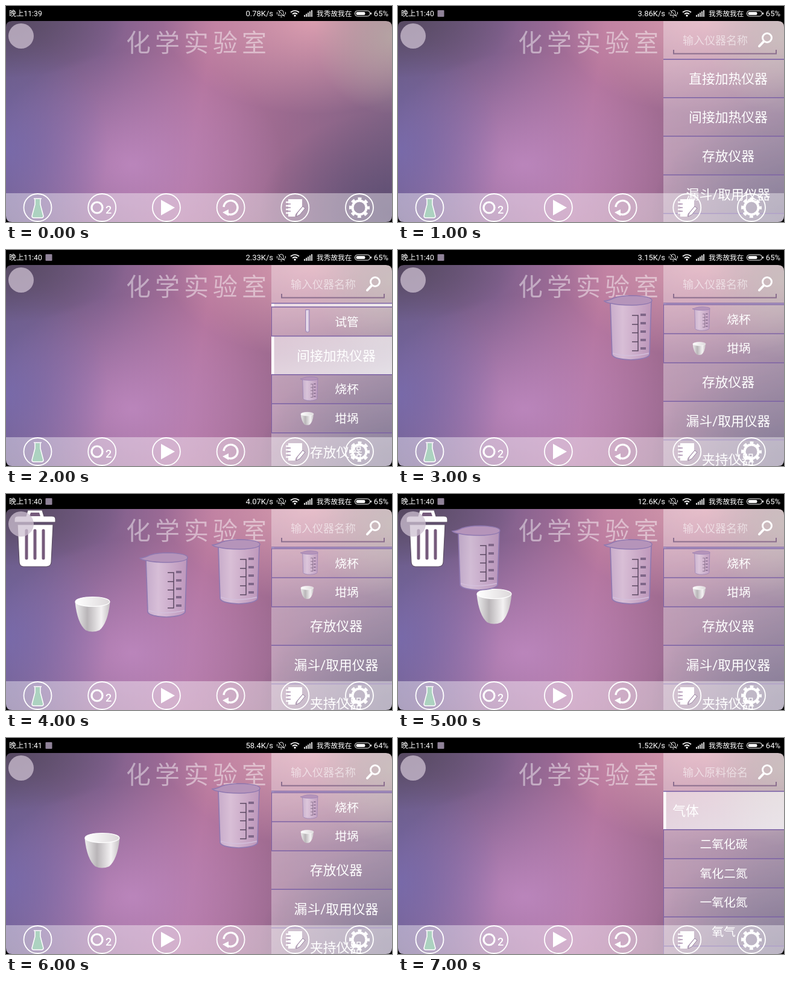
Write an HTML page that moves like this. It is 640 px wide and 360 px high and loops after 8 s.

```html
<!DOCTYPE html>
<html lang="zh-CN">
<head>
<meta charset="utf-8">
<style>
html, body { margin: 0; width: 100%; height: 100%; overflow: hidden; background: #000 }
svg {
  display: block; width: 640px; height: 360px;
  background:
    radial-gradient(200px 95px at 0 25px, #56485fee, #56485f00),
    radial-gradient(170px 190px at 0 240px, #786bade0, #786bad00),
    radial-gradient(130px 130px at 640px 50px, #b5a3a3, #b5a3a300),
    radial-gradient(250px 160px at 510px 20px, #dc9fb0, #dc9fb000),
    radial-gradient(220px 170px at 640px 345px, #5c4d72, #5c4d7200),
    radial-gradient(250px 190px at 210px 265px, #ba85bb, #ba85bb00),
    linear-gradient(100deg, #66587f, #80608d 25%, #b4749c 50%, #99698e 72%, #7c6283);
}
text { font-family: Roboto, "Noto Sans CJK SC", "Noto Sans CJK", sans-serif; fill: #fff }
.line { fill: none; stroke: #fff }
</style>
</head>
<body>
<svg viewBox="0 0 640 360">
  <defs>
    <linearGradient id="row" x2="1" y2="1">
      <stop stop-color="#fff" stop-opacity=".16"/><stop offset="1" stop-color="#fff" stop-opacity=".05"/>
    </linearGradient>
    <linearGradient id="open" x2="1" y2="1">
      <stop stop-color="#fff" stop-opacity=".48"/><stop offset="1" stop-color="#fff" stop-opacity=".75"/>
    </linearGradient>
    <linearGradient id="glass">
      <stop stop-color="#cbb5d2"/><stop offset=".3" stop-color="#dfcbe0"/><stop offset="1" stop-color="#bf9cc0"/>
    </linearGradient>
    <linearGradient id="china">
      <stop stop-color="#eee"/><stop offset=".35" stop-color="#b9b5b8"/>
      <stop offset=".75" stop-color="#f4f2f3"/><stop offset="1" stop-color="#c4bfc2"/>
    </linearGradient>
    <linearGradient id="bowl">
      <stop stop-color="#fff"/><stop offset="1" stop-color="#dcd8da"/>
    </linearGradient>
    <clipPath id="list"><path d="M440 88h200v272h-200z"/></clipPath>

    <g id="beaker">
      <path d="M10 14L13 102Q17 109 44 110Q70 109 75 102L78 12Z" fill="url(#glass)" fill-opacity=".85" stroke="#9079b1" stroke-width="1.7"/>
      <path d="M0 12Q9 11 16 7Q28 3 46 3Q79 4 79 11Q79 18 46 19Q22 19 12 16Q3 15 0 12Z" fill="#b594ba" stroke="#8f78b0" stroke-width="1.5"/>
      <path d="M14 99Q40 107 74 99" fill="none" stroke="#d3bfdc" stroke-width="1.5"/>
      <path d="M46 36H56V95H46M46 51H56M46 65H56M46 80H56" fill="none" stroke="#5b4862" stroke-width="1.5"/>
      <path d="M60 35h9m-9 14h9m-9 14h9m-9 14h9m-9 14h9" stroke="#806789" stroke-width="4"/>
    </g>
    <g id="crucible">
      <path d="M.5 10Q4 45 18 57Q29 62 41 57Q55 45 58.500 10Z" fill="url(#china)"/>
      <ellipse cx="29.500" cy="9.500" rx="28.500" ry="8" fill="url(#bowl)" stroke="#fff" stroke-width="1.2"/>
    </g>
    <g id="tube">
      <path d="M0 0H16V96Q8 108 0 96Z" fill="#d9c8e0" stroke="#9a86b8" stroke-width="3"/>
      <path d="M5 4V94" stroke="#fff" stroke-width="3"/>
    </g>
    <g id="trash" stroke-linejoin="round">
      <path d="M14 47H82V42Q82 37 76 37H63L60 27H36L33 37H20Q14 37 14 42ZM19 51H78L75 114Q74 121 67 121H29Q23 121 22 114Z" fill="#fff" stroke="#5f5166" stroke-width="1.2"/>
      <path d="M39 37L41 31H55L57 37Z" fill="#765b7c"/>
      <path d="M34 61V107M48 61V107M62 61V107" stroke="#765b7c" stroke-width="5" stroke-linecap="round"/>
    </g>
  </defs>

  <text x="199" y="76" font-size="41" font-weight="300" letter-spacing="7" fill-opacity=".45">化学实验室</text>
  <g id="scene"></g>
  <circle cx="25" cy="50" r="21" fill="#cdbfd0" opacity=".75"/>

  <path d="M0 312H640V360H0Z" fill="#fff" fill-opacity=".4"/>
  <g id="rings" class="line" stroke-width="1.8"></g>
  <path d="M46 321H59M48 322V331L43 350Q43 353 46 353H59Q62 353 62 350L57 331V322" fill="#acd2c0" stroke="#fff" stroke-width="1.5"/>
  <circle class="line" cx="151" cy="336" r="9" stroke-width="3.2"/>
  <text x="165" y="346" font-size="18" font-weight="500">2</text>
  <path d="M257 323L280 336L257 349Z" fill="#fff"/>
  <path class="line" d="M361 335A11.500 11.500 0 1 1 367 346" stroke-width="3.4"/>
  <path d="M359 344L369 339V350Z" fill="#fff"/>
  <path d="M468 322H491V334L480 347L479 351H468Z" fill="#fff"/>
  <path d="M464 327h8m-8 6h8m-8 6h8m-8 6h8" stroke="#fff" stroke-width="2.500"/>
  <path d="M467 330h5m-5 6h5m-5 6h5" stroke="#a68aac" stroke-width="1.5"/>
  <path d="M481 351L483 345L492 334L496 337L487 348Z" fill="#fff" stroke="#97809f"/>
  <circle class="line" cx="586" cy="336" r="11.5" stroke-width="4"/>
  <circle class="line" cx="586" cy="336" r="14.5" stroke-width="5" stroke-dasharray="5.7 5.690" stroke-dashoffset="2.850"/>

  <path d="M0 0H640V360H0ZM10 25Q0 25 0 35V350Q0 360 10 360H630Q640 360 640 350V35Q640 25 630 25Z" fill-rule="evenodd"/>
  <text id="clock" x="5" y="17" font-size="12.2"></text>
  <rect id="notice" x="65.500" y="7" width="11" height="11" rx="1" fill="#8f8298"/>
  <text id="speed" x="443" y="17" font-size="13" text-anchor="end"></text>
  <path class="line" d="M451 15.500Q453 14 453 11Q453 7 456.500 7Q460 7 460 11Q460 14 462 15.500ZM455 18h3M451 7L462 18M449.500 10v4M463.500 10v4" stroke-width=".9"/>
  <path class="line" d="M472 10.500Q479 5 486 10.500M475 13.500Q479 10 483 13.500" stroke-width="1.7"/>
  <circle cx="479" cy="16" r="1.700" fill="#fff"/>
  <path class="line" d="M495 18v-3M498 18v-5M501 18v-7M504 18v-9M507 18v-11" stroke-width="1.700"/>
  <text x="515" y="16.500" font-size="11.700">我秀故我在</text>
  <rect class="line" x="578.500" y="8" width="25" height="9" rx="4"/>
  <rect x="580.500" y="10" width="15" height="5" rx="2" fill="#fff"/>
  <path d="M605 11v3" stroke="#fff" stroke-width="2"/>
  <text id="charge" x="634" y="17" font-size="13" text-anchor="end"></text>
</svg>
<script>
const $ = id => document.getElementById(id);
const HEAD = 64.3, SUB = 48.5;
const head = (name, open) => ({ name, open, h: HEAD });
const sub = (name, icon) => ({ name, icon, h: SUB, x: icon ? 565 : 540 });

const closed = ['直接加热仪器', '间接加热仪器', '存放仪器', '漏斗/取用仪器', '夹持仪器'].map(n => head(n));
const tools = [
  head('直接加热仪器', true), sub('试管', 'tube'),
  head('间接加热仪器', true), sub('烧杯', 'beaker'), sub('坩埚', 'crucible'),
  ...closed.slice(2)
];
const gases = [
  { ...head('气体', true), x: 477 },
  ...['二氧化碳', '氧化二氮', '一氧化氮', '氧气', '氮气'].map(n => sub(n))
];
// icon: x, offset inside the row, scale
const icons = { tube: [497, 5, .37], beaker: [488, 3, .37], crucible: [488.5, 14, .37] };

const use = (id, x = 0, y = 0, s = 1) => `<use href="#${id}" transform="translate(${x} ${y}) scale(${s})"/>`;
const text = (s, x, y, size, extra = '') =>
  `<text x="${x}" y="${y + size * .37}" font-size="${size}" text-anchor="middle" ${extra}>${s}</text>`;

function panel(rows, top, hint) {
  let y = top, list = '';
  for (const { name, open, icon, h, x = 547.5 } of rows) {
    list += `<rect x="440" y="${y}" width="200" height="${h}" fill="url(#${open ? 'open' : 'row'})"/>`;
    if (open) list += `<rect x="440" y="${y}" width="4.5" height="${h}" fill="#fff"/>`;
    if (h == SUB) list += `<path d="M440.5 ${y}v${h}" stroke="#7b61a5"/>`;
    list += `<path d="M440 ${y + .5}H640" stroke="#7b61a5" stroke-width="1.5"/>`;
    if (icon) {
      const [ix, dy, s] = icons[icon];
      list += use(icon, ix, y + dy, s);
    }
    list += text(name, x, y + h / 2 + (h == HEAD ? .7 : .5), h == HEAD ? 21.8 : 19.8);
    y += h;
  }
  return `<path d="M440 25H640V360H440Z" fill="#fff" fill-opacity=".23"/>
    <path d="M440 25H640V88H440Z" fill="url(#row)"/>
    ${text(hint, 526, 57, 18, 'fill-opacity=".55"')}
    <path d="M457 73V79.5H627V73" fill="none" stroke="#8b6e8e" stroke-width="2"/>
    <circle class="line" cx="612" cy="53" r="7.5" stroke-width="3"/>
    <path class="line" d="M606.5 59L599 67" stroke-width="4" stroke-linecap="round"/>
    <g clip-path="url(#list)">${list}<path d="M440 88.8H640" stroke="#7b61a5" stroke-width="1.6"/></g>`;
}

const toolPanel = (rows, top) => panel(rows, top, '输入仪器名称');
const scrolled = toolPanel(tools, -86.6);
const still = use('beaker', 342, 73);

// one entry per second: clock, speed, charge, scene
const steps = [
  ['11:39', '0.78', 65, ''],
  ['11:40', '3.86', 65, toolPanel(closed, 88)],
  ['11:40', '2.33', 65, toolPanel(tools, 30.2)],
  ['11:40', '3.15', 65, scrolled + still],
  ['11:40', '4.07', 65, scrolled + use('trash') + use('crucible', 114, 170) + use('beaker', 222, 95) + still],
  ['11:40', '12.6', 65, scrolled + use('trash') + use('crucible', 130, 157) + use('beaker', 90, 50) + still],
  ['11:41', '58.4', 64, scrolled + use('crucible', 130, 157) + still],
  ['11:41', '1.52', 64, panel(gases, 88, '输入原料俗名')]
];

$('rings').innerHTML = [0, 1, 2, 3, 4, 5]
  .map(i => `<circle cx="${52.5 + i * 106.7}" cy="336" r="23"/>`).join('');

let shown = -1;
function tick() {
  const step = Math.floor(performance.now() / 1000) % steps.length;
  if (step !== shown) {
    const [clock, speed, charge, scene] = steps[shown = step];
    $('clock').textContent = '晚上' + clock;
    $('speed').textContent = speed + 'K/s';
    $('charge').textContent = charge + '%';
    $('notice').style.display = step ? '' : 'none';
    $('scene').innerHTML = scene;
  }
  requestAnimationFrame(tick);
}
tick();
</script>
</body>
</html>
```
